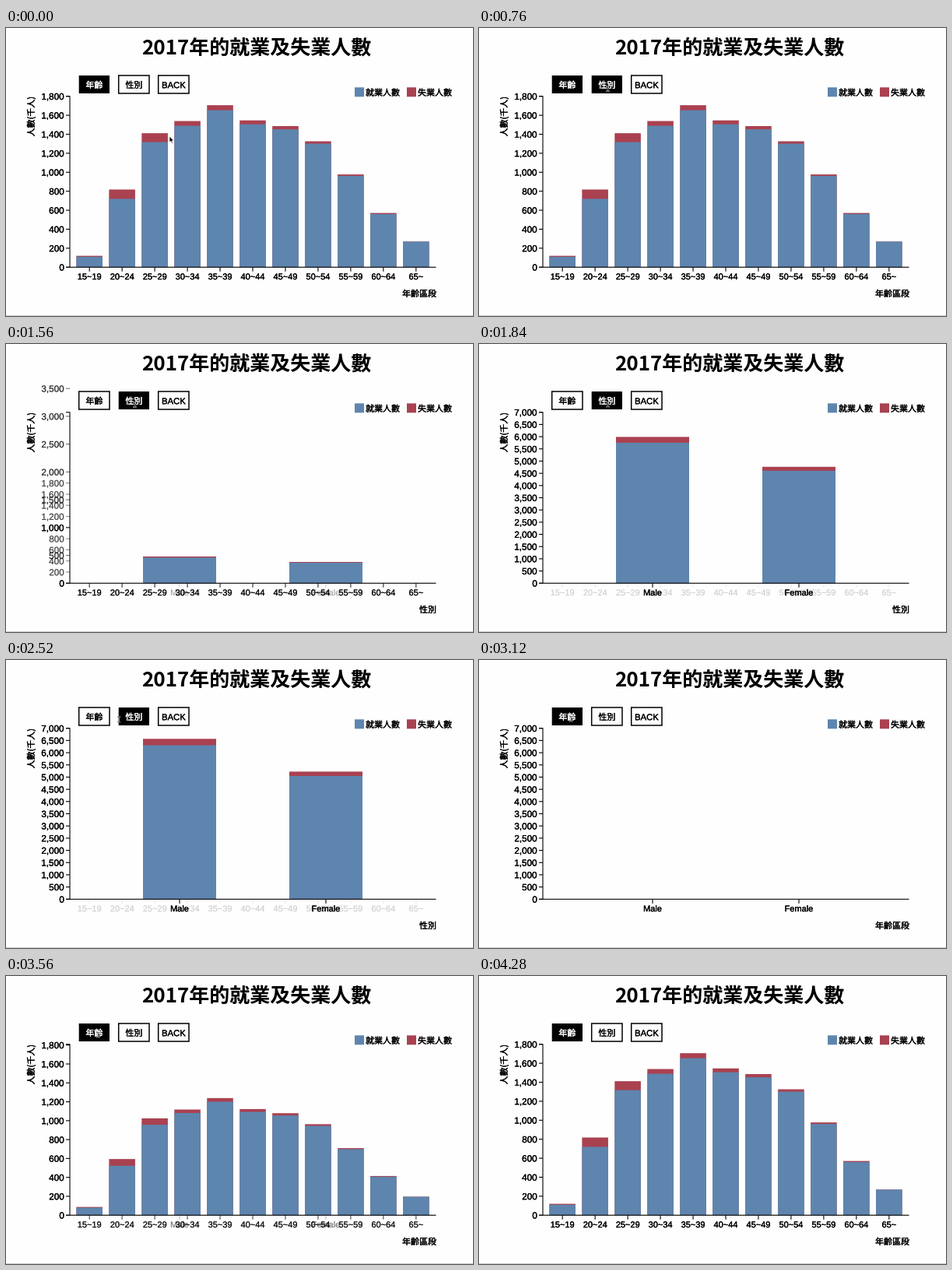
A matplotlib script for the animation above (4320 ms loop, 600x370 px).

```python
import matplotlib.pyplot as plt
from matplotlib.animation import FuncAnimation
from matplotlib.patches import Polygon, Rectangle
from matplotlib.patheffects import withStroke

plt.rcParams["path.snap"] = False

W, H, DPI = 600, 370, 100
FRAMES, STEP = 108, 40
PAPER, BLUE, RED = "#fefefe", "#5e85ae", "#aa4150"
LATIN, CJK = "Liberation Sans", "Noto Sans CJK JP"
LEFT, RIGHT, BASE, HEIGHT = 82, 552, 307.3, 219.6
CLIP_TOP = 48
TO_GENDER, TO_AGE = 1300, 3118
AXIS_MS, BAR_MS = 500, 750

AGE = dict(
    names=[f"{a}~{a + 4}" for a in range(15, 65, 5)] + ["65~"],
    employed=[110, 720, 1317, 1489, 1653, 1505, 1452, 1301, 961, 560, 269],
    jobless=[10, 98, 94, 50, 53, 41, 34, 25, 16, 11, 1],
    top=1800, step=200, padding=0.2, title="年齡區段")
GENDER = dict(
    names=["Male", "Female"], employed=[6305, 5047], jobless=[262, 178],
    top=7000, step=500, padding=0.5, title="性別")

BUTTONS = [("年齡", 93.7), ("性別", 144.7), ("BACK", 195.7)]
BTN_Y, BTN_W, BTN_H = 61, 39.3, 23

# time, x, y of the pointer
PATH = [(0, 210, 139), (40, 210, 139), (540, 167, 79), (720, 165.5, 77.5),
        (1120, 165.5, 78), (1880, 165.5, 77), (2400, 150, 76),
        (2880, 118, 75), (4160, 118, 75)]

fig = plt.figure(figsize=(W / DPI, H / DPI), dpi=DPI, facecolor=PAPER)
ax = fig.add_axes([0, 0, 1, 1])
ax.set_xlim(0, W)
ax.set_ylim(H, 0)
ax.axis("off")
moving = []


def px(n):
    return n * 72 / DPI


def text(x, y, s, size=11, font=CJK, ha="center", color="black",
         stroke=0.3, **kw):
    effects = [withStroke(linewidth=px(stroke), foreground=color)]
    return ax.text(x, y, s, fontsize=px(size), family=font, ha=ha,
                   va="baseline", color=color,
                   path_effects=effects if stroke else None, **kw)


def label(x, y, s, size=11, **kw):
    """Text centred vertically on y by its capital height."""
    return text(x, y + 0.37 * size, s, size, **kw)


def line(xs, ys, width=1.1, color="black", **kw):
    return ax.plot(xs, ys, color=color, lw=px(width),
                   solid_capstyle="butt", **kw)[0]


def rect(x, y, w, h, color, edge="none", width=0, z=1):
    return ax.add_patch(Rectangle((x, y), w, h, facecolor=color,
                                  edgecolor=edge, lw=px(width), zorder=z))


def ease(t, start, duration):
    u = min(max((t - start) / duration, 0), 1)
    return 4 * u ** 3 if u < 0.5 else 1 - (2 - 2 * u) ** 3 / 2


def bands(data):
    n, pad = len(data["names"]), data["padding"]
    step = (RIGHT - LEFT) / (n + pad)
    return [LEFT + step * (pad + i) for i in range(n)], step * (1 - pad)


def draw_bars(data, grow):
    scale = HEIGHT / data["top"] * grow
    xs, width = bands(data)
    for x, emp, out in zip(xs, data["employed"], data["jobless"]):
        h, extra = emp * scale, out * scale
        moving.append(rect(x, BASE - h - extra, width, h + extra, RED))
        moving.append(rect(x, BASE - h, width, h, BLUE))


def draw_x_ticks(data, alpha):
    if alpha < 0.01:
        return
    xs, width = bands(data)
    for x, name in zip(xs, data["names"]):
        x += width / 2
        moving.append(line([x, x], [BASE, BASE + 5.5], alpha=alpha, zorder=3))
        moving.append(label(x, 319, name, font=LATIN, alpha=alpha, zorder=3))


def draw_y_ticks(old, new, p):
    before = set(range(0, old["top"] + 1, old["step"]))
    after = set(range(0, new["top"] + 1, new["step"]))
    scale = HEIGHT * ((1 - p) / old["top"] + p / new["top"])
    for v in sorted(before | after):
        alpha = 1 if v in before & after else p if v in after else 1 - p
        y = BASE - v * scale
        if y < CLIP_TOP or alpha < 0.01:
            continue
        moving.append(line([77, LEFT], [y, y], alpha=alpha, zorder=3))
        moving.append(label(75, y, f"{v:,}", 11.7, font=LATIN, ha="right",
                            alpha=alpha, zorder=3))


def pointer(t):
    for (t0, x0, y0), (t1, x1, y1) in zip(PATH, PATH[1:]):
        if t0 <= t < t1:
            u = (t - t0) / (t1 - t0)
            u = u * u * (3 - 2 * u)
            return x0 + (x1 - x0) * u, y0 + (y1 - y0) * u
    return None


def draw_buttons(selected, spot):
    hovering = False
    for name, x in BUTTONS:
        over = (spot is not None and x <= spot[0] <= x + BTN_W
                and BTN_Y <= spot[1] <= BTN_Y + BTN_H)
        hovering |= over
        if over or name == selected:
            fill, edge, ink = "black", "none", "white"
        else:
            fill, edge, ink = PAPER, "black", "black"
        moving.append(rect(x, BTN_Y, BTN_W, BTN_H, fill, edge, 1.5, 4))
        latin = name.isascii()
        moving.append(label(x + BTN_W / 2, 73, name, 11.3 if latin else 11,
                            font=LATIN if latin else CJK, color=ink,
                            zorder=5))
    return hovering


def draw_pointer(spot, beam):
    x, y = spot
    if beam:
        for width, color in ((1.4, "white"), (0.7, "#222222")):
            for xs, ys in (([x, x], [y - 2, y + 3]),
                           ([x - 2, x, x + 2], [y - 3, y - 2, y - 3]),
                           ([x - 2, x, x + 2], [y + 4, y + 3, y + 4])):
                moving.append(line(xs, ys, width, color, zorder=6))
        return
    shape = [(0, 0), (0, 8), (1.8, 6.4), (3.1, 9.2), (4.4, 8.6), (3.2, 5.9),
             (5.7, 5.7)]
    moving.append(ax.add_patch(Polygon(
        [(x + dx, y + dy) for dx, dy in shape], facecolor="black",
        edgecolor="white", lw=px(0.7), zorder=6)))


def draw_static():
    label(321.5, 23.7, "2017年的就業及失業人數", 26, weight="bold", stroke=0)
    for x, color, name in ((448, BLUE, "就業人數"), (515, RED, "失業人數")):
        rect(x, 76.3, 12, 12, color)
        label(x + 14, 82.7, name, ha="left")
    text(36, 113.7, "人數(千人)", rotation=90, rotation_mode="anchor")
    top = BASE - HEIGHT
    line([77, LEFT, LEFT, 77], [top, top, BASE, BASE], zorder=3)
    line([LEFT, RIGHT + 0.5], [BASE, BASE], zorder=3)
    line([0, W], [369.5, 369.5], color="#cfcfcf")


def update(frame):
    while moving:
        moving.pop().remove()
    t = frame * STEP
    gender = TO_GENDER <= t < TO_AGE
    old, new = (AGE, GENDER) if gender else (GENDER, AGE)
    start = TO_GENDER if gender else TO_AGE
    if t < TO_GENDER:
        start = -BAR_MS
    grow = ease(t, start, BAR_MS)
    # the outgoing age labels linger faintly under the gender chart
    fade = min(grow, 0.912) if gender else grow

    draw_bars(new, grow)
    draw_x_ticks(old, 1 - fade)
    draw_x_ticks(new, fade if fade < 0.9 else 1)
    draw_y_ticks(old, new, ease(t, start, AXIS_MS))
    moving.append(label(553, 341, new["title"], ha="right"))

    spot = pointer(t)
    hovering = draw_buttons("性別" if gender else "年齡", spot)
    if spot:
        draw_pointer(spot, hovering)
    return moving


draw_static()
anim = FuncAnimation(fig, update, frames=FRAMES, interval=STEP,
                     init_func=lambda: [], repeat=True, repeat_delay=0,
                     blit=False)
plt.show()
```
